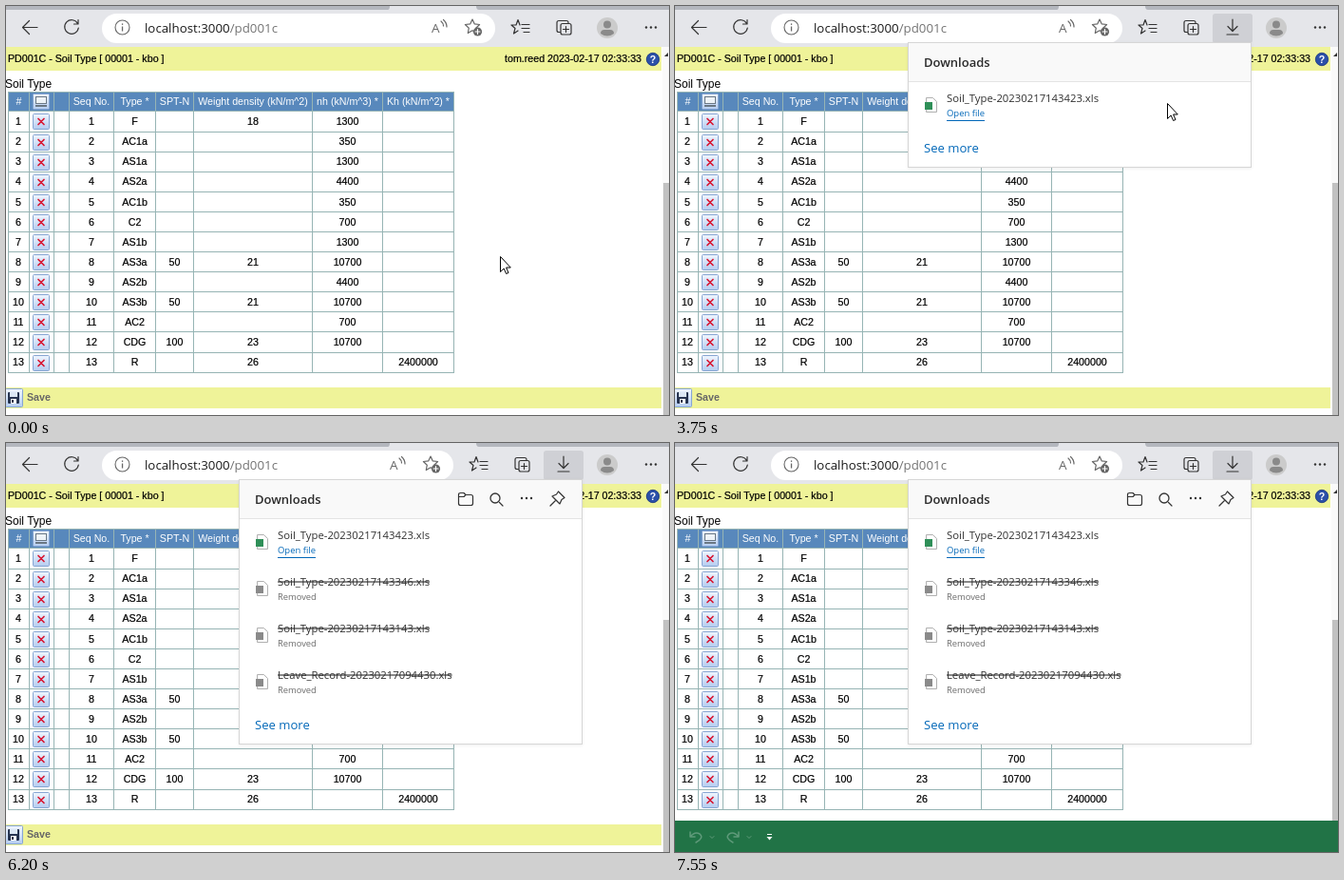
Recreate the animation shown at these times as an HTML page. Size 698 px wide and 430 px high, loop 8 s.

```html
<!DOCTYPE html>
<html lang="en">
<head>
<meta charset="utf-8">
<title>Soil type export</title>
<style>
  html, body { margin: 0; width: 100%; height: 100%; overflow: hidden; background: #fff; }
  svg { display: block; width: 698px; height: 430px; }
  text { white-space: pre; }
  .page text { font: 10.667px "Liberation Sans", Arial, sans-serif; }
  .page .ink text { stroke: #000; stroke-width: .22; }
  .ui text { font-family: "Open Sans", "Noto Sans", sans-serif; }
  .line { fill: none; stroke: #333; stroke-width: 1.2; stroke-linecap: round; stroke-linejoin: round; }
</style>
</head>
<body>
<svg id="stage" viewBox="0 0 698 430"></svg>
<script>
const LOOP = 8000;

// ---- markup helpers ----
const rect = (x, y, w, h, fill, more = '') =>
  `<rect x="${x}" y="${y}" width="${w}" height="${h}" fill="${fill}" ${more}/>`;
const text = (x, y, str, fill = '#000', more = '') =>
  `<text x="${x}" y="${y}" fill="${fill}" ${more}>${str}</text>`;
const mid = (x, y, str, fill) => text(x, y, str, fill, 'text-anchor="middle"');
const line = (d, more = '') => `<path class="line" d="${d}" ${more}/>`;
const shape = (d, fill, more = '') => `<path d="${d}" fill="${fill}" ${more}/>`;
const dot = (x, y, r, fill, more = '') => `<circle cx="${x}" cy="${y}" r="${r}" fill="${fill}" ${more}/>`;
const group = (id, body) => `<g id="${id}">${body}</g>`;
const ink = body => `<g class="ink">${body}</g>`;
const at = (x, y, body) => `<g transform="translate(${x} ${y})">${body}</g>`;
const size = px => `font-size="${px}"`;
const dots = (x, y) => [-5, 0, 5].map(d => dot(x + d, y, 1.2, '#333')).join('');
const button = (x, y, w, h) => rect(x + .5, y + .5, w - 1, h - 1, 'url(#glass)', 'stroke="#86a5d2" rx="1"');

function star(r) {
  let d = '';
  for (let i = 0; i < 10; i++) {
    const a = i * Math.PI / 5 - Math.PI / 2, k = i % 2 ? r * .48 : r;
    d += (i ? 'L' : 'M') + (k * Math.cos(a)).toFixed(1) + ' ' + (k * Math.sin(a)).toFixed(1);
  }
  return d + 'Z';
}

const folder = (x, y) => at(x, y, line('M-7.5 -4.5Q-7.5 -6.5 -5.5 -6.5H-2L0 -4.5H5.5Q7.5 -4.5 7.5 -2.5V4.5Q7.5 6.5 5.5 6.5H-5.5Q-7.5 6.5 -7.5 4.5ZM-7.5 -2.5H-2L0 -4.5'));
const trash = (x, y) => at(x, y, line('M-7 -5.5H7M-2.5 -5.5Q-2.5 -8 0 -8T2.5 -5.5M-5.5 -5.5L-4.5 8H4.5L5.5 -5.5M-1.7 -2V4.5M1.7 -2V4.5'));

// ---- browser chrome ----
const BAR_GREY = '#e5e6ea';

function chrome() {
  return rect(0, 0, 698, 43, BAR_GREY)
    + rect(0, 0, 698, 4, '#b4b7be')
    + shape('M402 4Q404 4 404 0H495Q495 4 498 4Z', BAR_GREY)
    + line('M33 22.5H18M24.5 15.5L17.5 22.5L24.5 29.5', 'stroke-width="1.4"')
    + line('M75.5 18.5A7.3 7.3 0 1 0 76.3 23M76 14.5V19H71.5', 'stroke-width="1.4"')
    + `<rect id="pill" x="101" y="8" width="414" height="31" rx="15.5" fill="#fff"/>`
    + dot(122.5, 22.5, 7.5, 'none', 'stroke="#666" stroke-width="1.1"')
    + rect(121.9, 21.5, 1.3, 5, '#666') + rect(121.9, 18.4, 1.3, 1.5, '#666')
    + text(146, 27.5, 'localhost:3000<tspan fill="#747474">/pd001c</tspan>', '#1b1b1b', size(13.3))
    + group('tools',
        text(448, 28, 'A', '#666', size(13.5))
        + line('M458 16Q460.5 18 460.5 21M460.5 14.5Q464 17.5 464 22', 'style="stroke:#666"')
        + at(491, 22, line(star(8), 'style="stroke:#666"'))
        + dot(496.5, 27, 4.6, '#666') + line('M494 27H499M496.5 24.5V29.5', 'style="stroke:#fff"')
        + at(540, 22, line('M-1 4L-5.5 7L-4 1.5L-8 -2H-3L-1 -7.5L1 -2'))
        + line('M543 19.5H551M543 23.5H551M545 27.5H551')
        + line('M584 27.5H582Q580 27.5 580 25.5V17.5Q580 15.5 582 15.5H590Q592 15.5 592 17.5M586 18.5H593Q595 18.5 595 20.5V28Q595 30 593 30H586Q584 30 584 28V20.5Q584 18.5 586 18.5ZM589.5 21.5V27.5M586.5 24.5H592.5'))
    + group('saveTool',
        rect(566, 8, 42, 31, '#cfd0d5', 'rx="3"')
        + line('M587 14V26M582 21.5L587 26.5L592 21.5M581 30H593', 'stroke-width="1.4"'))
    + dot(633, 23, 11, '#cbcbcb') + dot(633, 19.5, 4, '#8a8a8a')
    + shape('M626 29Q626 25 630 25H636Q640 25 640 29Q633 34 626 29Z', '#8a8a8a')
    + dots(679, 22.5);
}

// ---- web page ----
const EDGES = [2, 24, 50, 66, 113, 157, 197, 322, 396, 471];
const HEADS = ['#', '', '', 'Seq No.', 'Type *', 'SPT-N', 'Weight density (kN/m^2)', 'nh (kN/m^3) *', 'Kh (kN/m^2) *'];
// type, SPT-N, density, nh, Kh
const SOILS = ['F,,18,1300', 'AC1a,,,350', 'AS1a,,,1300', 'AS2a,,,4400', 'AC1b,,,350', 'C2,,,700', 'AS1b,,,1300',
  'AS3a,50,21,10700', 'AS2b,,,4400', 'AS3b,50,21,10700', 'AC2,,,700', 'CDG,100,23,10700', 'R,,26,,2400000'];
const rowTop = i => 110.95 + i * 21.09;
const center = c => (EDGES[c] + EDGES[c + 1]) / 2 + .5;

function table() {
  let heads = '', cells = '', icons = '', grid = 'M2 90.5H472';
  HEADS.forEach((h, c) => heads += mid(center(c), 104, h, '#fff'));
  icons += button(28, 92, 18, 17) + rect(31.5, 95.5, 11, 7, '#eef3f8', 'stroke="#6b7885"') + rect(31, 104, 12, 2, '#6b7885');
  SOILS.forEach((soil, i) => {
    const base = Math.round(rowTop(i) + 14.2), y = Math.floor(rowTop(i)) + 3;
    cells += mid(13, base, i + 1) + mid(center(3), base, i + 1);
    soil.split(',').forEach((v, c) => { if (v) cells += mid(center(c + 4), base, v); });
    icons += button(28, y, 18, 17)
      + line(`M34 ${y + 5.5}L40 ${y + 11.5}M40 ${y + 5.5}L34 ${y + 11.5}`, 'style="stroke:#d81632;stroke-width:1.7"');
  });
  for (let i = 0; i <= SOILS.length; i++) grid += `M2 ${Math.floor(rowTop(i)) + .5}H472`;
  EDGES.forEach(x => grid += `M${x + .5} 90V386`);
  return rect(2, 90, 470, 21, '#5888bc') + heads + icons + ink(cells)
    + `<path d="${grid}" stroke="#96b4b4" fill="none"/>`;
}

function page() {
  return rect(0, 42, 698, 388, '#fff')
    + rect(0, 43, 690, 25, '#eff399')
    + ink(text(2, 59, 'PD001C - Soil Type [ 00001 - kbo ]')
      + text(669, 59, 'tom.reed 2023-02-17 02:33:33', '#000', 'text-anchor="end"'))
    + dot(681, 56, 6.7, '#2b50a8', 'stroke="#16337c" stroke-width=".8"')
    + text(681, 60, '?', '#fff', 'text-anchor="middle" style="font-weight:bold"')
    + text(-1, 85.5, 'Soil Type', '#000', 'style="font-size:12px"')
    + table()
    + rect(0, 401, 690, 22, '#eff399')
    + button(-1, 402, 19, 20)
    + rect(2, 406, 12, 12, '#26334f', 'rx="1"') + rect(4, 406, 8, 5, '#dce7f5') + rect(5, 413, 6, 5, '#fff') + rect(6, 414, 2, 3, '#26334f')
    + text(22, 415, 'Save', '#666', 'style="font-weight:bold"')
    + rect(691, 43, 7, 387, '#fafafa') + rect(692, 186, 6, 244, '#c1c1c1')
    + shape('M693 53L697 49V53Z', '#333');
}

function tableTools() {
  return line('M484.5 93V101M481 98L484.5 101.5L488 98M480 104.5H489', 'style="stroke:#111;stroke-width:1.5"')
    + button(496, 91, 15, 15)
    + dot(504.5, 97, 3, '#e9f6ff', 'stroke="#3679c0" stroke-width="1.3"')
    + line('M502 99.5L499 102.5', 'style="stroke:#a1495c;stroke-width:1.8"')
    + rect(516, 93, 12, 11, '#2c8a4b')
    + button(534, 91, 15, 15)
    + line('M538.5 94V103M541.5 94V103M544.5 94V103M537.5 100H539.5M540.5 96.5H542.5M543.5 100H545.5', 'style="stroke:#3d5e90;stroke-width:1"');
}

const tooltip = () => rect(528.5, 117.5, 49, 24, '#fff', 'stroke="#555"') + text(536, 134, 'Export', '#505050', size(11.1));

// ---- downloads panel ----
const ITEM = 49;
const FILES = ['Soil_Type-20230217143423.xls', 'Soil_Type-20230217143346.xls', 'Soil_Type-20230217143143.xls', 'Leave_Record-20230217094430.xls'];

function fileItem(name, i) {
  const y = i * ITEM, gone = i > 0;
  const icon = shape(`M264.5 ${y + 96.5}H271.5L275.5 ${y + 100.5}V${y + 111.5}H264.5Z`, '#fff', 'stroke="#b0b0b0"')
    + rect(263, y + 101, 8, 8, gone ? '#8a8a8a' : '#2f8f58');
  const title = text(286, y + 101, name, '#303030', size(11.3) + (gone ? ' text-decoration="line-through"' : ''));
  const note = gone ? text(286, y + 115.7, 'Removed', '#6a6a6a', size(9.35))
    : text(286, 116, 'Open file', '#0067b8', size(9.45)) + rect(286, 120, 40, 1, '#0067b8');
  return icon + title + note;
}

function panel() {
  return `<rect id="sheet" x="245.5" y="38.5" width="361" height="278" fill="#fff" stroke="#d6d6d6" filter="url(#soft)"/>`
    + rect(246, 39, 360, 40, '#f9f9f9') + rect(246, 79, 360, 1, '#e4e4e4')
    + text(262, 64, 'Downloads', '#2b2b2b', size(13) + ' font-weight="600"')
    + group('panelTools', folder(484, 59)
        + line('M519.5 62.5L523 66', 'stroke-width="1.4"') + dot(515, 58, 5, 'none', 'stroke="#333" stroke-width="1.3"')
        + dots(548, 58)
        + line('M581.5 51L588 57.5L585 59.5L583 64L575 56L579.5 54ZM579 60L573 66'))
    + group('hover', rect(246, 80, 356, 49, '#f4f4f4') + folder(518, 103) + trash(566, 103))
    + fileItem(FILES[0], 0)
    + group('older', FILES.slice(1).map((f, i) => fileItem(f, i + 1)).join(''))
    + group('more', text(262, 301, 'See more', '#0067b8', size(13.1)));
}

// ---- spreadsheet window and its alert ----
const undo = x => line(`M${x - 6} 409V414H${x - 1}M${x - 6} 414Q${x - 1} 408 ${x + 4} 411Q${x + 9} 415 ${x} 420`, 'style="stroke:#5f9a7a;stroke-width:1.5"');
const chevron = x => line(`M${x - 2} 413.5L${x} 415.5L${x + 2} 413.5`, 'style="stroke:#5f9a7a;stroke-width:1"');

function sheetBar() {
  return rect(0, 397, 698, 33, '#217346')
    + undo(22) + chevron(39)
    + `<g transform="matrix(-1 0 0 1 122 0)">${undo(61)}</g>` + chevron(78)
    + rect(97, 411, 5, 1, '#fff') + shape('M96.5 414H102.5L99.5 417.5Z', '#fff');
}

function alertBox() {
  return rect(484.5, 374.5, 432, 270, '#f2f2f2', 'stroke="#bbb"')
    + text(492, 391, 'Tabulorin Cells', '#111', size(10.3))
    + shape('M515 414L528 438H502Z', '#f4d21f', 'stroke="#c9a800" stroke-linejoin="round"')
    + rect(514, 421, 2.4, 8, '#222') + rect(514, 431, 2.4, 2.4, '#222')
    + text(543, 432, "The file format and extension of 'Soil_Type-20230217143423.xls'", '#000', size(9.8));
}

// ---- pointers, hot spot at 0,0 ----
const arrow = () => shape('M.5 .5V16.5L4.2 13L6.6 18.5L9 17.5L6.6 12H11.3Z', '#fff', 'stroke="#000"');
const hand = () => shape('M-1.7 13V2Q-1.7 .5 0 .5T1.7 2V8Q3.4 6.8 5 8.6Q6.8 7.6 8 9.4Q10.6 8.6 10.8 11V16Q10.8 19 9 21V23.5H0V21.5Q-3 18 -5.5 14.5Q-6.5 12 -4.5 11.5Q-3 11.5 -1.7 13Z', '#fff', 'stroke="#000" stroke-linejoin="round"')
  + shape('M1.7 8V12M5 9V12M8 10V13', 'none', 'stroke="#000"');

const stage = document.getElementById('stage');
stage.innerHTML = `<defs>
    <linearGradient id="glass" x2="0" y2="1"><stop stop-color="#f0f6ff"/><stop offset="1" stop-color="#b4ccf0"/></linearGradient>
    <filter id="soft" x="-5%" y="-5%" width="110%" height="112%"><feDropShadow dx="0" dy="1" stdDeviation="1.5" flood-opacity=".07"/></filter>
  </defs>`
  + `<g class="page">${page()}</g>`
  + `<g class="ui">${chrome()}`
  + group('tableTools', tableTools()) + group('tooltip', tooltip()) + group('panel', panel())
  + group('sheetBar', sheetBar()) + group('alertBox', alertBox())
  + group('arrow', arrow()) + group('hand', hand()) + '</g>';

const el = {};
stage.querySelectorAll('[id]').forEach(n => el[n.id] = n);

// ---- timeline: every state holds until the next ----
const POINTER = [
  [0, 'arrow', 520, 263], [180, 'arrow', 520, 245], [255, 'arrow', 519, 228], [330, 'arrow', 519, 212],
  [1110, 'arrow', 509, 198], [1200, 'arrow', 487, 158], [1280, 'arrow', 459, 122], [1360, 'arrow', 443, 108], [1440, 'arrow', 436, 103],
  [2030, 'arrow', 461, 103], [2090, 'arrow', 488, 103], [2150, 'hand', 509, 103], [2310, 'hand', 514, 103], [2460, 'hand', 519, 102],
  [3740, 'arrow', 518, 102],
  [4430, 'arrow', 503, 110], [4500, 'arrow', 470, 134], [4570, 'arrow', 430, 141], [4650, 'arrow', 390, 118], [4720, 'arrow', 364, 99],
  [4960, 'arrow', 350, 104], [5030, 'arrow', 332, 110], [5100, 'hand', 319, 114], [5170, 'hand', 314, 115],
  [5740, 'none'], [6020, 'hand', 314, 115], [6200, 'none']];
const HOVER = [[0, -1], [4430, 0], [4500, 1], [4650, 0], [6200, -1]];
const PANEL = [[0, 0, 0], [3600, .4, 5], [3670, .8, 2], [3740, 1, 0]];
const BAR = [[0, 0], [6260, .6], [6320, 1]];
const ALERT = [[0, 0, 1], [6380, .3, 1], [6440, .65, 1.025], [6510, .88, 1.04], [6580, 1, 1.05],
  [7390, .6, 1.035], [7470, .22, 1.01], [7550, 0, 1]];

const pick = (keys, t) => keys.reduce((last, k) => k[0] <= t ? k : last);
const show = (node, on) => node.setAttribute('visibility', on ? 'inherit' : 'hidden');
const fade = (node, o) => { show(node, o > 0); node.setAttribute('opacity', o); };
const move = (node, x, y) => node.setAttribute('transform', `translate(${x} ${y})`);

function draw(t) {
  const [, kind, x = 0, y = 0] = pick(POINTER, t);
  for (const name of ['arrow', 'hand']) {
    show(el[name], kind === name);
    move(el[name], x, y);
  }

  show(el.tableTools, t >= 1280);
  show(el.tooltip, t >= 2920 && t < 3540);

  const saving = t >= 3540;
  show(el.saveTool, saving);
  move(el.tools, saving ? -44 : 0, 0);
  el.pill.setAttribute('width', saving ? 370 : 414);

  const [, opacity, drop] = pick(PANEL, t);
  const full = t >= 3960, less = full ? 0 : 3 * ITEM;
  fade(el.panel, opacity);
  move(el.panel, 0, drop);
  el.sheet.setAttribute('height', 278 - less);
  move(el.more, 0, -less);
  show(el.older, full);
  show(el.panelTools, full);

  const item = pick(HOVER, t)[1];
  show(el.hover, item >= 0);
  move(el.hover, 0, Math.max(item, 0) * ITEM);

  fade(el.sheetBar, pick(BAR, t)[1]);
  const [, alpha, k] = pick(ALERT, t);
  fade(el.alertBox, alpha);
  el.alertBox.setAttribute('transform', `translate(700 510) scale(${k}) translate(-700 -510)`);
}

const start = performance.now();
function tick() {
  draw((performance.now() - start) % LOOP);
  requestAnimationFrame(tick);
}
tick();
</script>
</body>
</html>
```
